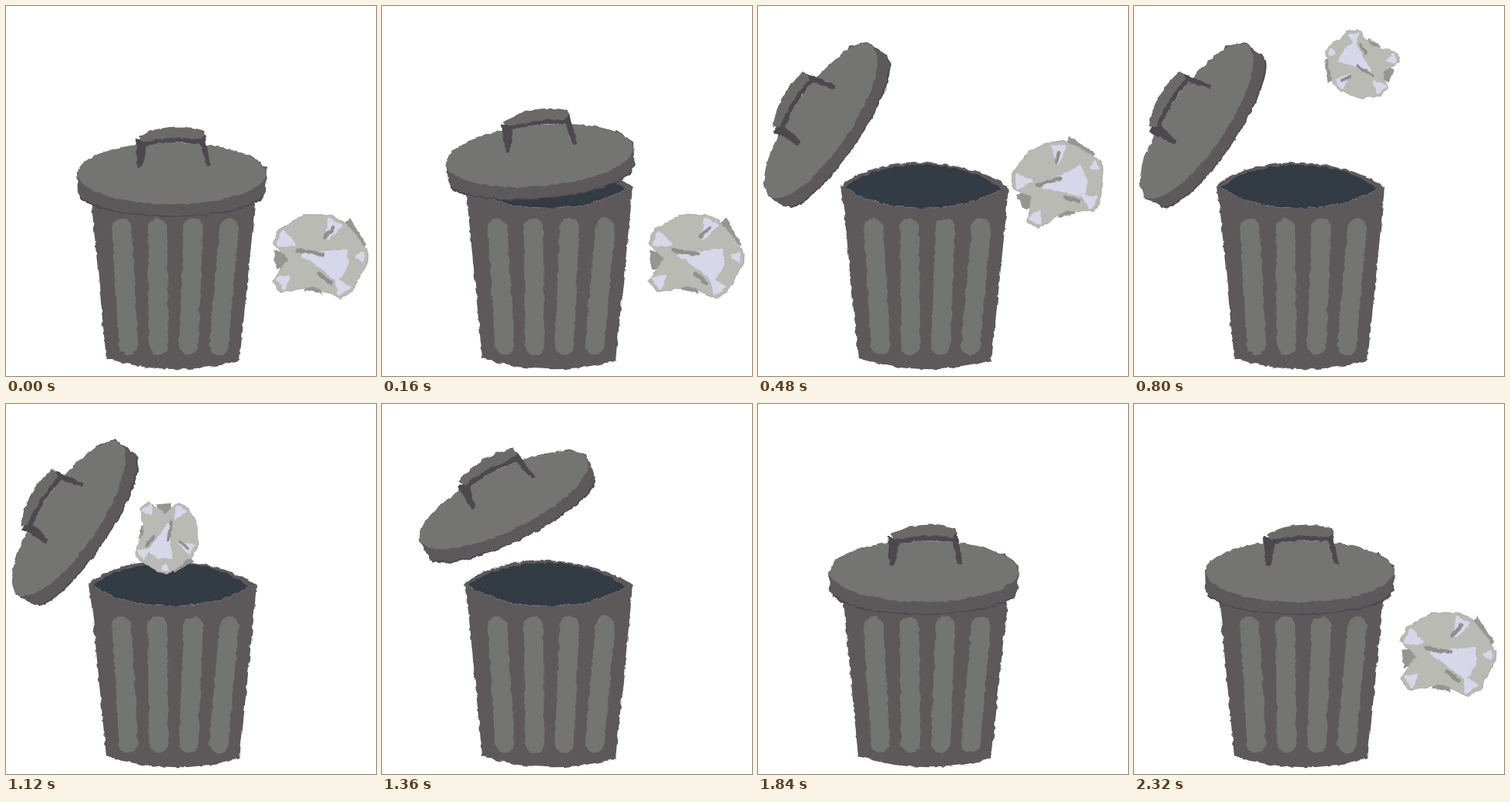
An HTML page for the animation above (2400 ms loop, 480 px wide and 480 px high).

```html
<!DOCTYPE html>
<html lang="en">
<head>
<meta charset="utf-8">
<title>Trash can</title>
<style>
  html, body { margin: 0; width: 100%; height: 100%; overflow: hidden; background: #fff; }
  svg { display: block; width: 100%; height: 100%; }
  .rough { filter: url(#rough); }
  .body { fill: #5d595b; }
  .gray { fill: #747472; }
  .dark { fill: #4d484e; }
  .hole { fill: #333b44; }
  #ribs { stroke: #747472; stroke-width: 25; stroke-linecap: round; }
  .base { fill: #bababa; fill: #babab4; stroke: #a8a8a3; }
  .flap { fill: #959592; }
  .light { fill: #d6d7e9; stroke: #d6d7e9; stroke-width: 4; stroke-linejoin: round; }
  .crease { fill: none; stroke: #8f8f8c; stroke-width: 5; stroke-linecap: round; }
</style>
</head>
<body>
<svg viewBox="0 0 480 480">
  <filter id="rough" filterUnits="userSpaceOnUse" x="0" y="0" width="480" height="480" color-interpolation-filters="sRGB">
    <feTurbulence type="fractalNoise" baseFrequency=".11" numOctaves="2" result="n"/>
    <feDisplacementMap in="SourceGraphic" in2="n" scale="5" xChannelSelector="R" yChannelSelector="G"/>
  </filter>

  <g class="rough">
    <path class="body" d="M107 234C135 208 185 203 212 203S295 212 325 235L216 262Z"/>
    <path class="hole" d="M113 235C140 212 185 206 214 206S285 213 315 237C285 256 250 262 214 262S140 254 113 235Z"/>
  </g>

  <g class="rough"><g id="paper"></g></g>

  <g class="rough">
    <path class="body" d="M107 234L113 235C140 254 178 262 214 262S285 256 315 237L325 235 322 270 303 460Q215 484 130 457L112 268Z"/>
    <path id="ribs"/>
  </g>

  <g class="rough"><g id="lid"><g transform="translate(-217.5 -208)">
    <path class="dark" d="M93 217L96 249A122 32 0 0 0 334 248L337 215Z"/>
    <path class="body" d="M92 215L93 242A123 35 0 0 0 337 241L338 210 318 193Z"/>
    <ellipse class="gray" cx="215" cy="217" rx="122" ry="40"/>
    <path class="dark" d="M168 172L181 174Q215 168 253 171L258 167 265 207 260 208 252 179Q215 174 183 181L177 209 171 210Z"/>
    <path fill="#6a6a68" d="M172 169Q210 149 256 161L258 168 252 173Q215 168 178 176Z"/>
  </g></g></g>
</svg>
<script>
const STEP = 80, FRAMES = 30;
const $ = s => document.querySelector(s);
const clamp = v => Math.min(1, Math.max(0, v));
const smooth = u => u * u * (3 - 2 * u);

// Ribs lean inwards towards the foot of the can
$('#ribs').setAttribute('d', [0, 1, 2, 3].map(i => `M${150 + 46.5 * i} 288L${159 + 39 * i} 440`).join(''));

const polar = (deg, r) => {
  const a = deg * Math.PI / 180;
  return `${r * Math.cos(a)} ${r * Math.sin(a)}`;
};
const shape = (cls, points) => `<path class="${cls}" d="M${points.join('L')}Z"/>`;

function crumple() {
  // Tips: angle, radius, half width, radius of the dent after it
  const tips = [[-157, 63, 9, 56], [-65, 54, 10, 53], [3, 63, 5, 59], [56, 63, 8, 42], [144, 70, 7, 42]];
  const flaps = [[-32, 62, 20], [100, 50, 14], [173, 60, 12]];
  const outline = tips.flatMap(([a, r, w, dent], i) => {
    const next = i < 4 ? tips[i + 1][0] : tips[0][0] + 360;
    return [polar(a - w, r), polar(a + w, r), polar((a + next) / 2, dent)];
  });
  return flaps.map(([a, r, w]) => shape('flap', ['0 0', polar(a - w, r), polar(a + w, r)])).join('')
    + shape('base', outline)
    + tips.map(([a, r, w]) => shape('light', [polar(a - w, r - 7), polar(a + w, r - 7), polar(a, r - 3 * w)])).join('')
    + shape('light', ['-22 0', '34 -6', '35 15', '23 33', '-2 13'])
    + '<path class="crease" d="M-28 -6L4 -1M7 -23l10 -12M-1 24l15 12"/>';
}
$('#paper').innerHTML = crumple();

function place(el, x, y, angle, scale) {
  el.setAttribute('transform', `translate(${x} ${y}) rotate(${angle}) scale(${scale})`);
}

// The lid swings up and over to the left, later back the same way
function moveLid(f) {
  const p = clamp(Math.min(f - 1, 20 - f) / 5) ** 1.5;
  const arc = Math.sin(Math.PI * p);
  place($('#lid'), 217.5 - 142 * p + 5 * arc, 208 - 66 * p - 62 * arc, -56 * p, 1 - .03 * p);
}

// The paper rises, spins and drops into the can, then lies there again
function movePaper(f) {
  const u = f < 25 ? clamp((f - 4) / 11) : 0, e = smooth(u);
  const y = 323 - 285 * Math.sin(1.9 * u) + 500 * u ** 14;
  place($('#paper'), 407 - 202 * e, y, -275 * e, Math.max(.75, 1 - .44 * e));
  $('#paper').style.display = u < 1 ? '' : 'none';
}

let last = -1;
function draw(now) {
  const f = Math.floor(now / STEP) % FRAMES;
  if (f !== last) {
    last = f;
    moveLid(f);
    movePaper(f);
    const seed = f === 28 ? 27 : f; // edges rest for one step
    $('feTurbulence').setAttribute('seed', seed % 5 + 1);
  }
  requestAnimationFrame(draw);
}
draw(performance.now());
</script>
</body>
</html>
```
